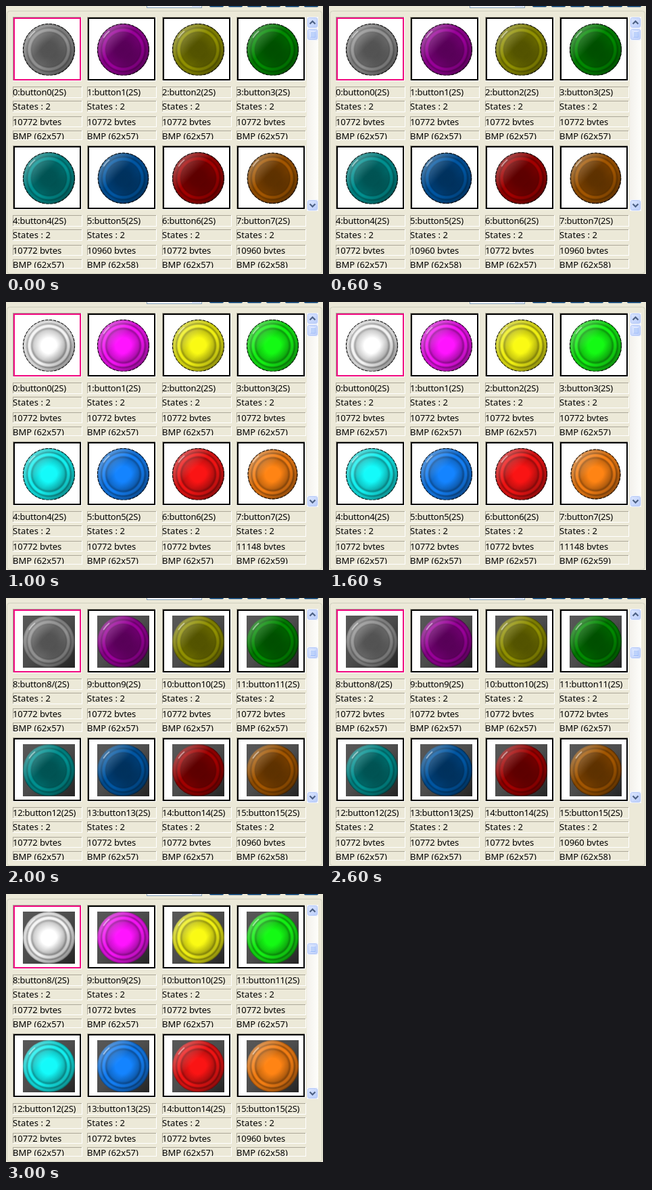
Recreate the animation shown at these times as an HTML page. Size 469x396 px, loop 4 s.

```html
<!DOCTYPE html>
<html lang="en">
<head>
<meta charset="utf-8">
<title>Button gallery</title>
<style>
  html, body { margin: 0; width: 100%; height: 100%; overflow: hidden; background: #ece9d8; }
  svg { display: block; }
  text { font: 13px "Noto Sans", "Open Sans", sans-serif; fill: #000; white-space: pre; }
  rect { shape-rendering: crispEdges; }
  .soft { shape-rendering: auto; }
  .scene { visibility: hidden; animation: show 4s step-end infinite; }
  @keyframes show {
    0% { visibility: visible; }
    25%, 100% { visibility: hidden; }
  }
</style>
</head>
<body>
<svg id="stage" width="469" height="396" viewBox="0 0 469 396"></svg>
<script>
const COLS = [10, 120, 231, 341];
const ROW = 190;
const OFF = [[128,128,128], [136,0,136], [128,128,0], [0,122,0],
             [0,128,128], [0,76,144], [144,0,0], [144,76,0]];
const LIT = [[255,255,255], [255,20,255], [250,250,20], [20,250,20],
             [20,250,250], [20,132,255], [250,20,20], [255,132,20]];

// Position along the radius and brightness there
const OFF_SHADE = [[0,.64], [.3,.66], [.62,.78], [.67,.74], [.72,1.12],
                   [.78,1.12], [.84,.74], [.9,1], [.95,.92], [1,.5]];
const LIT_SHADE = [[0,1], [.3,1], [.58,.8], [.66,.6], [.72,.95],
                   [.78,.95], [.84,.58], [.9,.84], [.95,.8], [1,.5]];

// Caption lines: top, height, visible text height, tracking
const FIELDS = [
  { y: 119, h: 17, clip: 16, gap: -.25 },
  { y: 140, h: 17, clip: 16, gap: .1 },
  { y: 163, h: 16, clip: 13, gap: -.1 },
  { y: 184, h: 14, clip: 13, gap: 0 }
];

const rect = (x, y, w, h, fill, extra = "") =>
  `<rect x="${x}" y="${y}" width="${w}" height="${h}" fill="${fill}" ${extra}/>`;

const sunken = (x, y, w, h) =>
  rect(x, y, w, 1, "#aca899") + rect(x, y, 1, h, "#aca899") +
  rect(x, y + h - 1, w, 1, "#fff") + rect(x + w - 1, y, 1, h, "#fff");

const shade = (rgb, k) => `rgb(${rgb.map(v => Math.min(255, Math.round(v * k)))})`;

function radial(id, rgb, stops) {
  return `<radialGradient id="${id}">` +
    stops.map(([at, k]) => `<stop offset="${at}" stop-color="${shade(rgb, k)}"/>`).join("") +
    `</radialGradient>`;
}

function defs() {
  return `<defs>
    ${OFF.map((c, i) => radial("off" + i, c, OFF_SHADE)).join("")}
    ${LIT.map((c, i) => radial("lit" + i, c, LIT_SHADE)).join("")}
    <linearGradient id="gloss" x1=".12" y1=".12" x2=".88" y2=".88">
      <stop offset="0" stop-color="#fff" stop-opacity=".32"/>
      <stop offset=".4" stop-color="#fff" stop-opacity="0"/>
      <stop offset=".6" stop-color="#000" stop-opacity="0"/>
      <stop offset="1" stop-color="#000" stop-opacity=".3"/>
    </linearGradient>
    <linearGradient id="plate" x1="0" y1="0" x2="1" y2="1">
      <stop offset="0" stop-color="#585858"/>
      <stop offset=".5" stop-color="#4c4c4c"/>
      <stop offset="1" stop-color="#242424"/>
    </linearGradient>
    <linearGradient id="track">
      <stop offset="0" stop-color="#f3f1ec"/>
      <stop offset="1" stop-color="#fefefb"/>
    </linearGradient>
    <linearGradient id="knob" x1="0" y1="0" x2="1" y2="1">
      <stop offset="0" stop-color="#dce6ff"/>
      <stop offset="1" stop-color="#bacdfa"/>
    </linearGradient>
    <clipPath id="cell"><rect x="-40" y="-40" width="80" height="78"/></clipPath>
  </defs>`;
}

function frame(x, y, picked) {
  return sunken(x, y, 102, 95) +
    rect(x + 2, y + 2, 98, 91, "#fff", `stroke="${picked ? "#f0087f" : "#000"}" stroke-width="2"`);
}

function field(x, y, f, text) {
  return sunken(x, y, 103, f.h) +
    `<svg x="${x}" y="${y}" width="102" height="${f.clip}">
      <text x="0" y="13" letter-spacing="${f.gap}">${text}</text></svg>`;
}

function button(cx, cy, i, lit, plate, r) {
  const disc = (fill, extra = "") => `<circle r="${r}" fill="${fill}" ${extra}/>`;
  const edge = `stroke="#000" stroke-dasharray="4 2"`;
  return `<g transform="translate(${cx} ${cy})">
    ${plate ? rect(-38.5, -38.5, 77, 77, "url(#plate)") : ""}
    <g clip-path="url(#cell)">
      ${disc(`url(#${lit ? "lit" : "off"}${i})`)}
      ${disc("url(#gloss)")}
      ${plate ? "" : `<circle r="${r - .4}" fill="none" ${edge}/>`}
    </g>
    <path d="M-29 -18Q-26 -23 -21 -27" fill="none" stroke="#fff" stroke-width="1.8"
      stroke-linecap="round" opacity=".45"/>
  </g>`;
}

function pad(y, h) {
  return rect(445.5, y + .5, 16, h - 1, "#fff", 'rx="2" stroke="#eef2fd"') +
    rect(446.5, y + 1.5, 14, h - 3, "url(#knob)", 'rx="2" stroke="#b4c8f6" class="soft"');
}

function scrollKnob(y) {
  let out = pad(y, 18);
  for (let i = 0; i < 4; i++)
    out += rect(450, y + 5 + i * 2, 7, 1, "#eef4fe") + rect(451, y + 6 + i * 2, 7, 1, "#8cb0f8");
  return out;
}

function scrollArrow(y, dir) {
  return pad(y, 17) +
    `<path d="M449.5 ${y + 8.5 + 2 * dir}l4 ${-4 * dir}l4 ${4 * dir}" fill="none" stroke="#4d6185" stroke-width="2.2"/>`;
}

function chrome() {
  let out = rect(0, 0, 469, 396, "#ece9d8");
  out += rect(208.5, -10.5, 81, 13, "#fff", 'stroke="#7f9db9"') + rect(275, 0, 13, 1, "#b9cbf5");
  for (let i = 0; i < 6; i++) out += rect(301 + i * 28, -10, 21, 11.5, "#003c74", 'rx="2" class="soft"');
  out += rect(1.5, 7.5, 466, 388, "none", 'rx="4" stroke="#d0d0bf" class="soft"');
  out += rect(445, 16, 17, 287, "url(#track)") + scrollArrow(16, 1) + scrollArrow(286, -1);
  COLS.forEach((x, c) => [0, 1].forEach(r => { out += frame(x, 16 + r * ROW, !c && !r); }));
  return out;
}

function sizeOf(i, page, lit) {
  if (page) return i === 7 ? [10960, 58] : [10772, 57];
  if (i === 7) return lit ? [11148, 59] : [10960, 58];
  return i === 5 && !lit ? [10960, 58] : [10772, 57];
}

function scene(n) {
  const page = n >> 1, lit = n & 1;
  let out = scrollKnob(page ? 72 : 33);
  for (let i = 0; i < 8; i++) {
    const x = COLS[i % 4], top = (i >> 2) * ROW, id = page * 8 + i;
    const [bytes, tall] = sizeOf(i, page, lit);
    const shrink = page ? 0 : (tall - 57) * .8;
    out += button(x + 53.5, top + 64.5, i, lit, page, 38.5 - shrink);
    const lines = [`${id}:button${id}${id === 8 ? "/" : ""}(2S)`, "States : 2",
                   `${bytes} bytes`, `BMP (62x${tall})`];
    lines.forEach((t, k) => { out += field(x, top + FIELDS[k].y, FIELDS[k], t); });
  }
  return `<g class="scene" style="animation-delay:${n ? n - 4 : 0}s">${out}</g>`;
}

document.getElementById("stage").innerHTML =
  defs() + chrome() + [0, 1, 2, 3].map(scene).join("");
</script>
</body>
</html>
```
